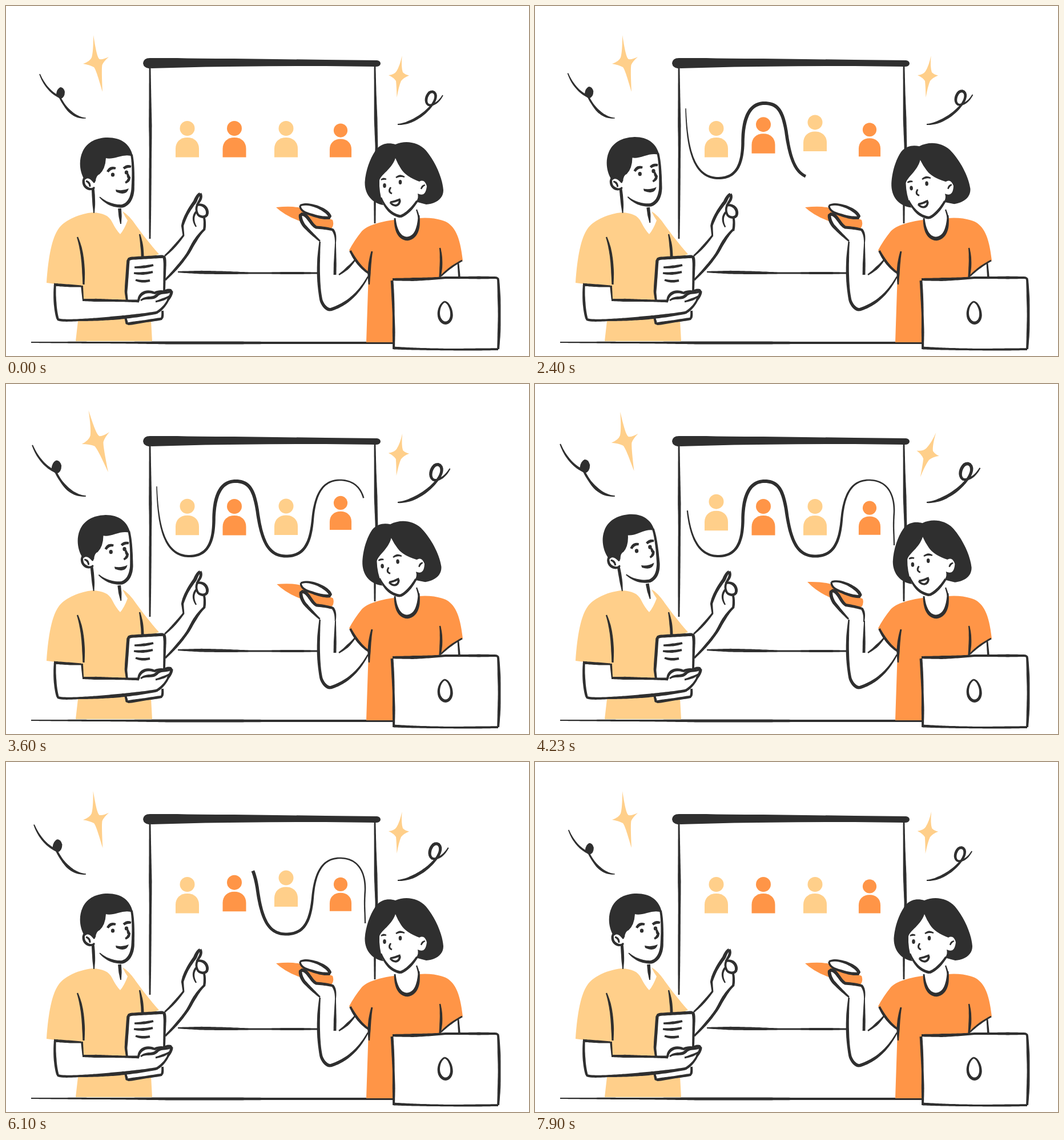
An HTML page that plays this animation: 916 by 612 pixels, repeating every 7930 ms.

```html
<!DOCTYPE html>
<html lang="en">
<head>
<meta charset="utf-8">
<title>Team presentation</title>
<style>
html, body { margin: 0; width: 100%; height: 100%; overflow: hidden; background: #fff; }
svg { display: block; width: 100%; height: 100%; }
</style>
</head>
<body>
<svg id="stage" viewBox="0 0 916 612"></svg>
<script>
const INK = '#2f2f2f', SAND = '#ffcf8a', ORANGE = '#ff9547', WHITE = '#fff';
const LOOP = 7930;
const stage = document.getElementById('stage');

function add(parent, tag, attrs = {}) {
  const el = document.createElementNS('http://www.w3.org/2000/svg', tag);
  for (const k in attrs) el.setAttribute(k, attrs[k]);
  parent.appendChild(el);
  return el;
}
const group = (parent = stage) => add(parent, 'g');
const fill = (parent, color, d) => add(parent, 'path', { d, fill: color });
const oval = (parent, cx, cy, rx, ry = rx, color = INK) =>
  add(parent, 'ellipse', { cx, cy, rx, ry, fill: color });

// A guide curve with a pen width that varies along its length.
function pen(d, widths) {
  const guide = document.createElementNS('http://www.w3.org/2000/svg', 'path');
  guide.setAttribute('d', d);
  const len = guide.getTotalLength();
  const widthAt = f => {
    const p = f * (widths.length - 1), i = Math.min(Math.floor(p), widths.length - 2);
    return widths[i] + (widths[i + 1] - widths[i]) * (p - i);
  };
  return {
    outline(from = 0, to = 1) {
      if (to - from < 0.001) return '';
      const n = Math.max(4, Math.ceil(len * (to - from) / 3)), a = [], b = [];
      for (let i = 0; i <= n; i++) {
        const f = from + (to - from) * i / n, s = f * len;
        const p = guide.getPointAtLength(s);
        const q = guide.getPointAtLength(Math.max(0, s - 0.6));
        const r = guide.getPointAtLength(Math.min(len, s + 0.6));
        const dx = r.x - q.x, dy = r.y - q.y, k = widthAt(f) / 2 / (Math.hypot(dx, dy) || 1);
        a.push((p.x - dy * k).toFixed(1) + ' ' + (p.y + dx * k).toFixed(1));
        b.unshift((p.x + dy * k).toFixed(1) + ' ' + (p.y - dx * k).toFixed(1));
      }
      return 'M' + a.concat(b).join('L') + 'Z';
    },
    near(x, y) {
      let best = 1e9, at = 0;
      for (let s = 0; s <= len; s++) {
        const p = guide.getPointAtLength(s), d = Math.hypot(p.x - x, p.y - y);
        if (d < best) { best = d; at = s; }
      }
      return at / len;
    }
  };
}
const WEIGHT = 0.8;
const brush = (parent, d, ...widths) =>
  fill(parent, INK, pen(d, widths.map(w => w + WEIGHT)).outline());

// Screen
fill(stage, INK, 'M240 100Q241 91 252 91L300 91Q330 92 400 92L560 94L650 95Q656 96 656 101Q655 106 648 106L560 105Q420 105 330 107L250 109Q241 108 240 100Z');
brush(stage, 'M252 107L253 230L252 407', 2, 3, 4.5, 3.5, 3.5, 3, 2);
brush(stage, 'M646 105Q647 190 649 245L646 345L646 380', 2, 3, 5, 4, 3, 3, 2);
brush(stage, 'M301 465Q360 466 420 467L547 467', 1.5, 5, 4.5, 2.5, 2.5, 3.5, 2);

// Wave on the screen
const wave = pen('M264 179C266 240 274 301 321 301C349 301 363 283 364 240C364 195 376 170 402 170C426 170 434 185 440 220C448 280 462 301 491 301C521 301 533 280 537 238C541 190 556 168 585 168C615 168 630 190 629 225C627 250 629 265 629 282',
  [1.5, 2.7, 4, 5, 6, 6, 5.6, 5.2, 4.8, 3.6, 2.6, 2.6, 2.2]);
const waveEl = fill(stage, INK, '');
const drawKeys = [[0, 0], [1.25, wave.near(364, 236)], [2.4, wave.near(474, 298)], [3.6, wave.near(626, 200)], [4, 1]];
const wipeKeys = [[4, 0], [4.95, wave.near(333, 299)], [6.1, wave.near(433, 190)], [7.85, 1]];

// Attendees on the screen
const icons = [[317.5, SAND, 1], [400, ORANGE, 1], [490.5, SAND, 1], [586, ORANGE, 0.93]].map(([x, color, s]) => {
  const outer = group();
  const g = add(outer, 'g', { transform: `translate(${x} 264.5) scale(${s})` });
  oval(g, 0, -50.5, 13, 13, color);
  fill(g, color, 'M-20.5 0V-15C-20.5 -27 -12 -34.5 0 -34.5S20.5 -27 20.5 -15V0Z');
  return outer;
});

// Sparkles and curls
const starL = group(), starR = group(), curlL = group(), curlR = group();
fill(starL, SAND, 'M153 51C157 75 160 91 164 93Q170 94 180 89Q171 97 168.5 103Q167 110 169 150C163 130 158 112 154 107Q147 103 135 101Q147 97 150 90Q153 80 153 51Z');
fill(starR, SAND, 'M693.5 87Q692 108 695 116Q699 120 706 121.5Q697 125 692 131Q688 140 684.5 160Q684 140 683 131Q679 125 670 121Q680 120 684 114Q690 104 693.5 87Z');
brush(curlL, 'M59 119C66 137 78 152 94 159', 1, 2, 2.5, 3);
fill(curlL, INK, 'M95 142Q101 142 103 150Q103 160 96 162Q89 160 88 154Q89 145 95 142Z');
brush(curlL, 'M94 159C103 177 117 196 140 196', 2.5, 2.5, 4, 3, 0.5);
brush(curlR, 'M686 207C708 207 738 188 750 167C757 153 748 146 741 152C733 161 735 174 743 173.5C753 172 760 165 765 156', 1, 4, 4, 3, 4, 4, 2.5, 1);

brush(stage, 'M44 588L300 589L690 589', 1.2, 2.2, 2.5, 4.2, 4.5, 3.5, 3.5, 3, 3);

// Man
const man = group();
fill(man, SAND, 'M152 361C170 362 180 366 186 378Q193 392 200 399Q207 391 213 375Q208 368 204 359Q216 366 228 384Q245 408 268 434L248 441L256 586H122L133 490Q100 488 71 484C74 440 80 405 93 388C105 373 130 363 152 361Z');
brush(man, 'M125 404C135 430 136 460 136 487', 1.5, 3.5, 4, 4, 2.5);
brush(man, 'M234 399Q239 420 239 439', 1.5, 4, 4);

brush(man, 'M278 437Q295 422 311 401', 2, 3.5, 2.5);
brush(man, 'M279 479Q312 446 323 425Q335 402 347 391', 2.5, 4, 4, 5, 3);
const manHand = group(man);
brush(manHand, 'M311 402L309 384C314 366 322 354 331 342Q335 331 340 328', 2, 3, 4.5, 4.5, 5, 5.5, 4);
brush(manHand, 'M340 328Q343 332 340 339L334 349', 4, 4, 3);
brush(manHand, 'M335 348C346 345 355 355 352 365Q347 372 337 366Q331 357 335 348', 3, 4.5, 4, 3, 3);
brush(manHand, 'M333 360Q324 371 333 386', 3, 2.5, 1.5);
brush(manHand, 'M347 370Q349 380 347 392', 3, 3.5, 3.5);

fill(man, WHITE, 'M213 443L278 438L274 546L211 556Z');
brush(man, 'M212 516L210 500L214 444Q216 441 224 441L276 438Q279 440 278 460L277 498', 3, 4.5, 4.5, 4.5, 4.5, 4.5, 3.5, 3);
brush(man, 'M209 544L212 556L272 547Q275 545 274 533', 3, 4.5, 3.5, 4, 3);
brush(man, 'M225 457Q242 457 258 453', 2.5, 4, 3);
brush(man, 'M224 467Q240 469 257 465', 2.5, 4, 3);
brush(man, 'M227 479Q238 483 252 480', 2.5, 4, 3);
fill(man, WHITE, 'M85 487C84 510 87 540 91 548Q97 551 130 549C180 548 240 541 264 536Q275 530 283 516Q291 505 290 497Q282 495 277 500Q268 498 260 502Q244 496 234 505L232 515Q190 515 135 516L131 490Z');
brush(man, 'M132 490Q105 489 84 487', 2.5, 4, 4);
brush(man, 'M86 486C84 510 87 538 91 548Q97 551 130 549C180 548 240 541 264 536Q277 528 284 514', 3, 4, 3.5, 3, 4.5, 5.5, 5, 4, 2.5);
brush(man, 'M133 489L135 514', 3, 1.5);
brush(man, 'M134 514Q190 515 233 516', 3, 4.5, 3.5, 3, 4);
brush(man, 'M232 516Q233 503 246 500Q254 499 260 502Q268 498 277 500Q284 495 290 498Q290 506 283 515', 3, 4.5, 4, 3.5, 4, 4.5, 3);
brush(man, 'M236 515C245 507 256 514 264 506S282 504 288 499', 2, 4, 4.5, 3.5, 2);
brush(man, 'M262 517Q278 513 287 507', 2, 3.5, 2);

const manHead = group(man);
brush(manHead, 'M152 316Q154 340 154 362', 4, 4.5, 4, 1);
brush(manHead, 'M199 354L201 381', 5, 4.5, 1);
fill(manHead, INK, 'M137 303C129 290 127 270 134 255C142 237 160 230 178 230C205 230 219 245 222 263Q212 259 196 264Q182 268 175 266Q174 285 164 294Q158 296 157 306L152 312Q148 298 137 303Z');
brush(manHead, 'M220 260Q224 280 222 322Q219 346 203 350Q180 350 164 334', 3, 3.5, 4, 5, 5, 4, 1);
fill(manHead, WHITE, 'M155 310Q145 294 137 303Q135 316 146 320L154 318Z');
brush(manHead, 'M155 309Q145 293 136 303Q134 316 146 320Q152 321 155 317', 2, 4, 3.5, 4, 2);
brush(manHead, 'M140 306Q147 308 147 316', 2, 3, 2);
brush(manHead, 'M178 290Q183 281 192 284', 3.5, 4.5, 3);
brush(manHead, 'M206 284Q212 279 219 281', 3.5, 4.5, 3);
oval(manHead, 187, 295, 3.2, 3.6);
oval(manHead, 211, 291, 3.2, 3.6);
brush(manHead, 'M213 293Q214 299 216 301Q214 307 209 309', 2.5, 4.5, 4, 2.5);
fill(manHead, INK, 'M192 321Q204 324 215 319Q211 333 193 325Z');

// Woman
const woman = group();
fill(woman, ORANGE, 'M680 374C655 377 632 384 623 394Q610 410 601 427Q614 452 635 467L631 588H690V477H760L764 470Q780 453 800 445C795 400 785 385 770 377Q750 369 723 371Q724 405 702 408Q683 404 680 374Z');
fill(woman, WHITE, 'M548 410Q545 480 552 515Q560 535 580 527Q615 508 634 473L611 443Q592 458 580 470L576 396Z');
brush(woman, 'M550 410C547 440 545 480 552 515Q558 530 568 531Q610 518 634 473', 1.5, 4, 4.5, 4, 5, 4.5, 3, 1.5);
brush(woman, 'M577 414L576 470', 1, 2.5, 4, 4);
brush(woman, 'M583 470Q600 459 612 443', 1.5, 4, 1.5);
brush(woman, 'M603 428Q616 454 635 467', 3, 4, 3.5, 3);
brush(woman, 'M641 429Q635 455 636 487', 2, 4, 4.5, 1.5);
brush(woman, 'M760 423Q764 445 760 474', 1.5, 3.5, 4, 2.5);
brush(woman, 'M762 472Q778 456 799 445', 2, 2.5, 2);
brush(woman, 'M792 450L794 475', 2, 3);

const womanHand = group(woman);
fill(womanHand, ORANGE, 'M473 352Q500 349 515 353L572 374Q575 382 571 388Q545 393 520 378Q490 368 473 352Z');
fill(womanHand, WHITE, 'M516 364C528 362 532 380 543 387Q558 389 572 391Q577 400 577 414L550 412Q520 388 516 364Z');
brush(womanHand, 'M577 414Q578 398 572 391Q558 388 543 387C532 380 528 362 516 364Q514 372 522 384Q535 398 550 411', 1, 3.5, 4, 4.5, 5, 5, 5, 4, 2);
fill(womanHand, WHITE, 'M515 348Q525 344 545 351Q566 360 568 370Q555 372 535 365Q515 358 515 348Z');
brush(womanHand, 'M515 349Q525 344 545 351Q566 360 568 370Q555 372 535 365Q515 360 515 349', 2.5, 3.5, 5, 4.5, 3.5, 2.5);

brush(woman, 'M681 371Q683 405 702 407Q724 405 723 366', 2, 4.5, 6, 5, 2);
brush(woman, 'M719 356Q722 364 723 370', 1.5, 2);
const womanHead = group(woman);
fill(womanHead, INK, 'M682 242C700 234 722 238 735 252C749 268 764 297 766 322C766 339 750 346 736 347L721 343L690 345L661 348C642 345 628 330 628.5 308C630 285 640 261 650 249C660 239 672 239 682 242Z');
fill(womanHead, WHITE, 'M682 266C676 285 656 295 654 305Q653 325 660 346Q672 366 692 368Q707 360 719 341Q723 335 721 328Q735 335 737 315Q733 302 724 307Q700 298 692 285Q686 276 682 266Z');
brush(womanHead, 'M657 335Q668 364 691 368Q706 362 720 341', 1.5, 3.5, 4, 4, 3);
brush(womanHead, 'M727 320Q729 314 734 313', 1.5, 2.5, 1.5);
brush(womanHead, 'M683 300Q690 295 698 299', 1.5, 3, 1.5);
brush(womanHead, 'M657 304Q661 301 666 303', 1.5, 2.5, 1.5);
oval(womanHead, 663, 314, 2.8, 4);
oval(womanHead, 690.5, 308, 2.8, 4);
brush(womanHead, 'M674 317Q668 325 676 328', 2, 2.5, 2);
brush(womanHead, 'M673 343Q682 342 690 338Q690 348 682 349Q676 348 673 343', 2.5, 3, 3, 2.5);

// Laptop
const laptop = group();
fill(laptop, WHITE, 'M677 478L862 475L862 601L679 600Z');
brush(laptop, 'M676 480Q680 540 679 600', 4, 4, 3, 4, 3);
brush(laptop, 'M677 478Q720 479 770 475L858 475Q863 476 862 480', 3.5, 5, 3.5, 3, 4, 3);
brush(laptop, 'M862 478Q866 540 862 600', 3, 4.5, 4, 4.5, 3);
brush(laptop, 'M679 598Q760 602 862 600', 4, 3, 2.5, 3, 3);
brush(laptop, 'M768 517C759 522 756 536 759 545C764 558 777 557 780 544C782 534 776 518 768 517', 2, 3, 4, 4.5, 4, 3, 2);

// Motion, in seconds
const mix = (a, b, f) => a + (b - a) * f;
const smooth = f => (1 - Math.cos(Math.PI * f)) / 2;
function track(keys, t, ease = f => f) {
  if (t <= keys[0][0]) return keys[0][1];
  for (let i = 1; i < keys.length; i++) {
    const [t0, v0] = keys[i - 1], [t1, v1] = keys[i];
    if (t <= t1) return mix(v0, v1, ease((t - t0) / (t1 - t0)));
  }
  return keys[keys.length - 1][1];
}
const bump = (d, half) => Math.abs(d) < half ? (1 + Math.cos(Math.PI * d / half)) / 2 : 0;
const place = (el, x, y, turn, scale = 1) =>
  el.setAttribute('transform', `translate(${x} ${y}) rotate(${turn}) scale(${scale}) translate(${-x} ${-y})`);

const manNod = [[0, 0], [1.2, 1], [1.5, 1], [3, 0], [4.5, 1], [4.95, 1], [6, 0]];
const manWave = [[0, 0], [1.2, 1], [1.4, 1], [2.9, 0]];
const womanTilt = [[1.4, 0], [2.2, 1], [3.8, 1], [4.6, 0]];

function pose(t) {
  waveEl.setAttribute('d', wave.outline(track(wipeKeys, t), track(drawKeys, t)));
  icons.forEach((el, i) => {
    const lift = bump(t - 1.2 - 0.7 * i, 1.15) + bump(t - 4.65 - 0.72 * i, 1.15);
    el.setAttribute('transform', `translate(0 ${-11.4 * lift})`);
  });
  const l = bump(t % 3 - 0.8, 0.8), r = bump(t % 3 - 1.25, 0.8);
  place(starL, 157, 99, -10 * l, 1 + 0.15 * l);
  place(starR, 688, 121.5, 12.5 * r, 1 + 0.12 * r);
  const stretch = 1 + 0.1 * (1 - Math.cos(2 * Math.PI * t * 3 / 8));
  place(curlL, 140, 196, 0, stretch);
  place(curlR, 686, 207, 0, stretch);
  place(manHead, 155, 372, -7 * track(manNod, t, smooth));
  place(manHand, 317, 393, 8 * track(manWave, t, smooth));
  place(womanHead, 724, 372, -4 * track(womanTilt, t, smooth));
  place(womanHand, 550, 400, 5 * bump(t - 4.1, 0.8));
}

// The picture holds for 30 ms, then 70 ms, in turn.
const start = performance.now();
let shown = -1;
function tick() {
  const ms = (performance.now() - start) % LOOP;
  const step = 2 * Math.floor(ms / 100) + (ms % 100 >= 30 ? 1 : 0);
  if (step !== shown) pose((shown = step) * 0.05);
  requestAnimationFrame(tick);
}
tick();
</script>
</body>
</html>
```
